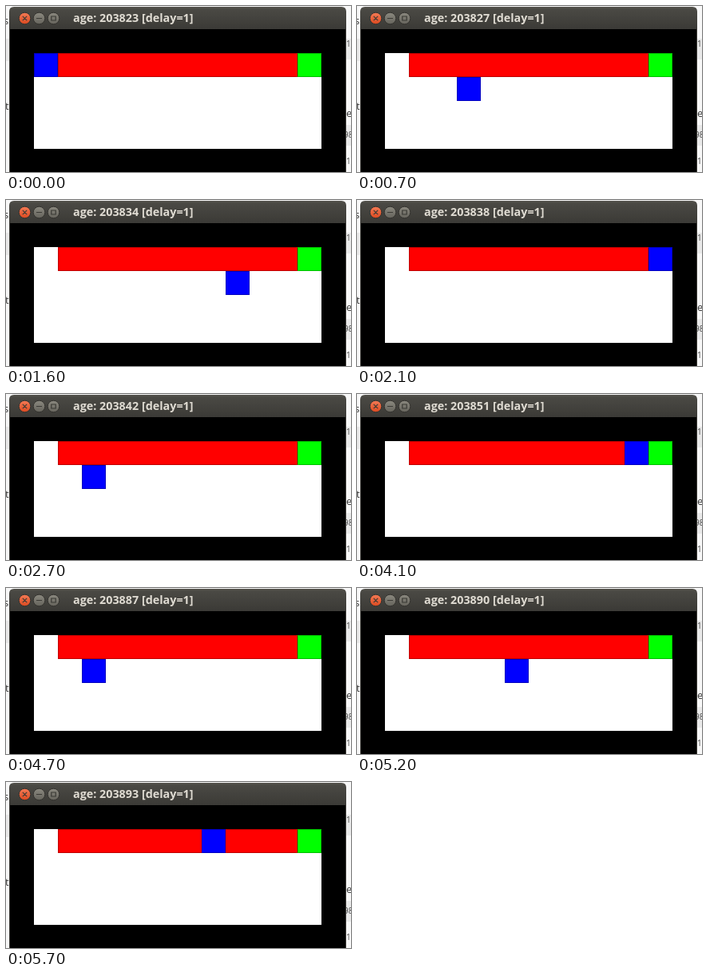
Write an HTML page that moves like this. It is 432 by 208 pixels and loops after 5800 ms.

```html
<!DOCTYPE html>
<html lang="en">
<head>
<meta charset="utf-8">
<title>Cliff walk</title>
<style>
  html, body { margin: 0; width: 100%; height: 100%; overflow: hidden; background: #f8f8f8; }
  svg { display: block; width: 432px; height: 208px; }
  text { font-family: "Open Sans", "Noto Sans", sans-serif; }
  .title { font-size: 14.35px; font-weight: 700; fill: #dfdbd2; }
  .page { font-size: 13px; fill: #333; }
  .small { font-size: 10px; fill: #444; }
  .icon { fill: none; stroke: #3b3a35; stroke-width: 1.2; }
  .edge { fill: none; stroke: #000; stroke-opacity: .25; }
</style>
</head>
<body>
<svg viewBox="0 0 432 208">
  <defs>
    <linearGradient id="bar" x2="0" y2="1">
      <stop offset="0" stop-color="#55534d"/>
      <stop offset=".12" stop-color="#4a4944"/>
      <stop offset="1" stop-color="#3b3a36"/>
    </linearGradient>
    <linearGradient id="close" x2="0" y2="1">
      <stop offset="0" stop-color="#f47b56"/>
      <stop offset="1" stop-color="#dc4a20"/>
    </linearGradient>
    <linearGradient id="knob" x2="0" y2="1">
      <stop offset="0" stop-color="#8a887f"/>
      <stop offset="1" stop-color="#66645c"/>
    </linearGradient>
  </defs>

  <!-- page behind the window -->
  <rect width="432" height="208" fill="#f8f8f8"/>
  <path d="M0 41h5v28H0zM425 41h7v26h-7zM425 149h7v26h-7z" fill="#e9e9e9"/>
  <text class="page" x="-3" y="23">s</text>
  <text class="page" x="-1" y="130">t</text>
  <text class="page" x="426" y="139">e</text>
  <text class="small" x="426" y="51">1</text>
  <text class="small" x="423" y="165">98</text>
  <text class="small" x="426" y="198">1</text>

  <!-- window -->
  <rect x="4" y="28" width="422" height="180" fill="#3c3b37"/>
  <rect x="5" y="29" width="420" height="179"/>
  <path d="M4 29V7q0-6 6-6H420q6 0 6 6V29z" fill="url(#bar)"/>
  <g stroke="#33322e">
    <circle cx="23.5" cy="15.5" r="7.3" fill="url(#close)"/>
    <circle cx="41.5" cy="15.5" r="7.3" fill="url(#knob)"/>
    <circle cx="59.5" cy="15.5" r="7.3" fill="url(#knob)"/>
  </g>
  <path class="icon" d="M20.8 12.8l5.4 5.4m0-5.4l-5.4 5.4M38 15.5h7M56.8 13h5.4v5h-5.4z"/>
  <text class="title" id="title" x="84" y="20"></text>

  <!-- grid world -->
  <g transform="translate(35 59)">
    <rect width="360" height="120" fill="#fff"/>
    <rect x="30" width="300" height="30" fill="#f00"/>
    <rect class="edge" x="30.5" y=".5" width="299" height="29"/>
    <rect x="330" width="30" height="30" fill="#0f0"/>
    <rect class="edge" x="330.5" y=".5" width="29" height="29"/>
    <g id="agent">
      <rect width="30" height="30" fill="#00f"/>
      <rect class="edge" x=".5" y=".5" width="29" height="29"/>
    </g>
  </g>
</svg>
<script>
  const LOOP = 5800, FRAME = 100, CELL = 30;
  const title = document.getElementById("title");
  const agent = document.getElementById("agent");

  // Each walk: first age, then moves from the start cell (r, d, u).
  const walks = [
    [203823, "drrrrrrdurrrrru"],
    [203839, "drrrrrrrrrru"],
    [203884, "drrrrrrru"]
  ];
  const delta = { r: [1, 0], d: [0, 1], u: [0, -1] };
  const steps = [];
  for (const [first, moves] of walks) {
    let age = first, x = 0, y = 0;
    steps.push({ age, x, y });
    for (const m of moves) {
      x += delta[m][0];
      y += delta[m][1];
      steps.push({ age: ++age, x, y });
    }
  }

  // Pace: [time in ms, step reached]
  const pace = [[0, 0], [700, 4], [1600, 11], [2700, 19], [4100, 28], [5200, 35], [5700, 38]];

  function stepAt(t) {
    const i = Math.max(1, pace.findIndex(p => p[0] >= t));
    const [t0, s0] = pace[i - 1], [t1, s1] = pace[i];
    return Math.round(s0 + (s1 - s0) * (t - t0) / (t1 - t0));
  }

  function draw(now) {
    const t = Math.floor((now % LOOP) / FRAME) * FRAME;
    const s = steps[stepAt(t)];
    title.textContent = `age: ${s.age} [delay=1]`;
    agent.setAttribute("transform", `translate(${s.x * CELL} ${s.y * CELL})`);
  }

  const start = performance.now();
  function tick() {
    draw(performance.now() - start);
    requestAnimationFrame(tick);
  }
  tick();
</script>
</body>
</html>
```
